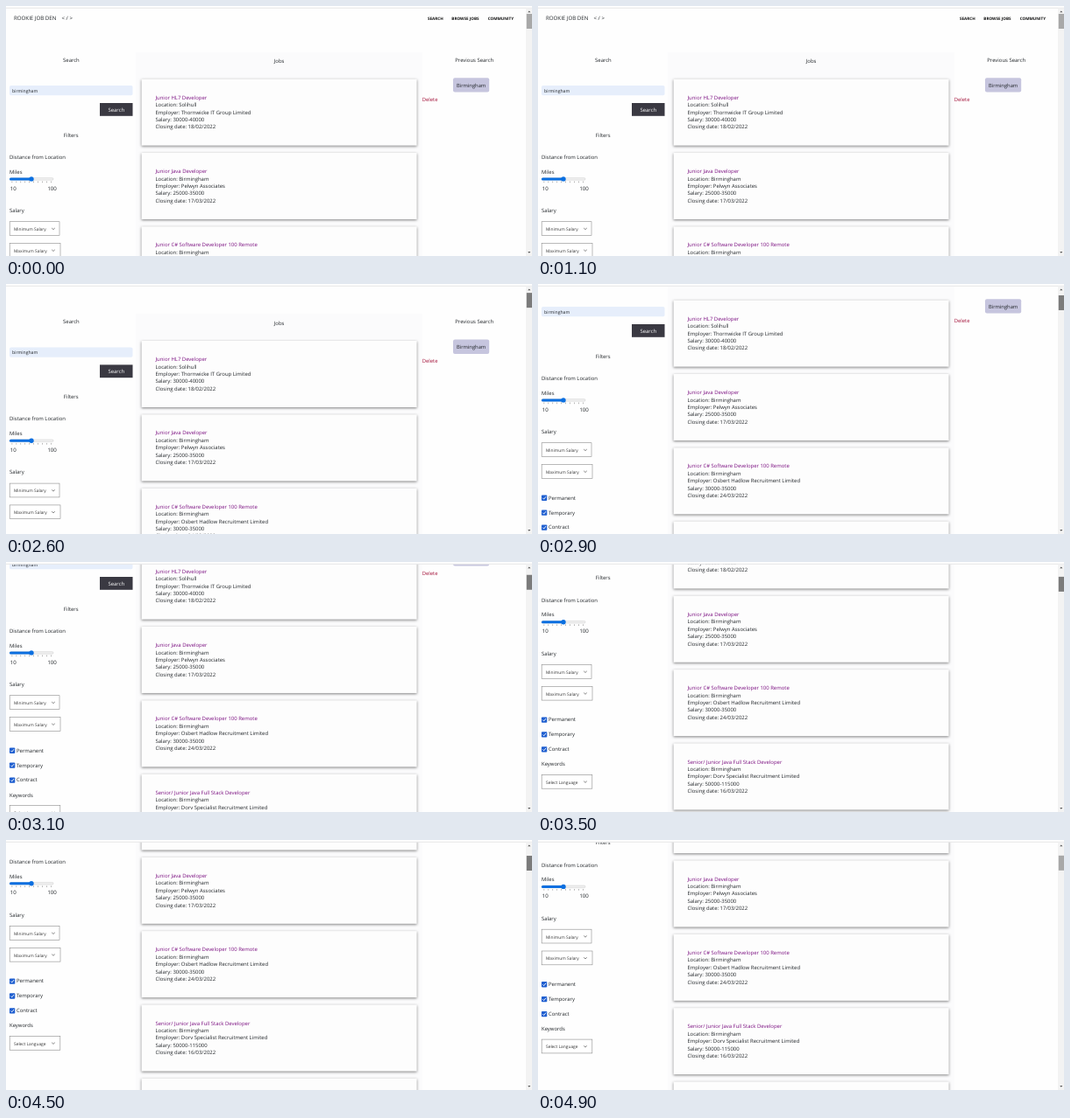
An HTML page for the animation above (5 s loop, 600 by 286 pixels).

```html
<!DOCTYPE html>
<html lang="en">
<head>
<meta charset="utf-8">
<title>Job board</title>
<style>
html, body { margin: 0; width: 100%; height: 100%; overflow: hidden; background: #fff; }
svg { display: block; width: 100vw; height: 100vh; }
text { font-family: "Open Sans", "Noto Sans", sans-serif; font-size: 5.95px; fill: #212529; text-rendering: geometricPrecision; white-space: pre; }
.card { fill: #fdfdfd; filter: drop-shadow(0 1px 1.6px rgba(0, 0, 0, .5)); }
</style>
</head>
<body>
<svg viewBox="0 0 600 286" preserveAspectRatio="none">
  <defs><clipPath id="view"><rect y="2.5" width="593" height="283.5"/></clipPath></defs>
  <rect width="600" height="286" fill="#fefefe"/>
  <g clip-path="url(#view)"><g id="page"></g></g>
  <rect y="1.8" width="600" height=".9" fill="#e4e4e6"/>
  <rect x="593" y="2.7" width="7" height="283.3" fill="#f3f3f3"/>
  <path d="M595.2 7.2L596.8 5.4L598.4 7.2Z M595.2 281L596.8 282.8L598.4 281Z" fill="#555"/>
  <rect id="thumb" x="593.8" y="9" width="6.2" height="17"/>
</svg>
<script>
const LOOP = 5000, STEP = 100;
const page = document.getElementById('page');
const thumb = document.getElementById('thumb');

function add(tag, attrs, content) {
  const el = document.createElementNS('http://www.w3.org/2000/svg', tag);
  for (const key in attrs) el.setAttribute(key, attrs[key]);
  if (content) el.textContent = content;
  page.appendChild(el);
  return el;
}

// y is the middle of the capitals
function label(content, x, y, { size = 5.95, fill = '#212529', anchor = 'start', weight = 400 } = {}) {
  const style = `font-size:${size}px;fill:${fill};font-weight:${weight}`;
  return add('text', { x, y: y + 2.1, 'text-anchor': anchor, style }, content);
}

function box(x, y, width, height, fill, more = {}) {
  return add('rect', { x, y, width, height, fill, ...more });
}

function header() {
  label('ROOKIE JOB DEN', 9, 14.2, { size: 6.15 });
  label('< / >', 63.5, 14.2, { size: 6.1 });
  [['SEARCH', 481], ['BROWSE JOBS', 508.3], ['COMMUNITY', 549.7]].forEach(([name, x]) =>
    label(name, x, 13.5, { size: 4.6, weight: 700, fill: '#111' }));
}

function dropdown(name, y, width) {
  box(4.2, y, width, 15.8, '#fff', { stroke: '#8c8c8c', 'stroke-width': .6 });
  label(name, 9, y + 8.2, { size: 4.85, fill: '#333' });
  add('path', { d: `M52.2 ${y + 7.3}l1.8 1.7l1.8 -1.7`, fill: 'none', stroke: '#444', 'stroke-width': .65 });
}

function checkbox(name, y) {
  box(4, y - 2.9, 6.3, 6.3, '#1f5fd0', { rx: .8 });
  add('path', { d: `M5.3 ${y + .3}l1.4 1.4l2.4 -3`, fill: 'none', stroke: '#fff', 'stroke-width': .9 });
  label(name, 12, y);
}

function slider() {
  box(4, 196.6, 50, 2.6, '#efefef', { rx: 1.3, stroke: '#c4c4c4', 'stroke-width': .4 });
  box(4, 196.4, 25, 3, '#0b6fe0', { rx: 1.5 });
  for (let i = 0; i < 10; i++) box(6.6 + i * 4.95, 200.5, .6, 1.7, '#888');
  add('circle', { cx: 29, cy: 197.9, r: 2.7, fill: '#0b6fe0' });
  label('10', 4.8, 208.5, { size: 6.1 });
  label('100', 47.4, 208.5, { size: 6.1 });
}

function filters() {
  label('Search', 74.4, 61.6, { anchor: 'middle' });
  box(4, 91, 140.5, 11.3, '#e6eefb', { rx: 1.8 });
  label('birmingham', 7, 96.8, { size: 5.1 });
  box(107, 111, 37.5, 14.8, '#3a3942');
  label('Search', 125.8, 118.6, { anchor: 'middle', fill: '#fff' });
  label('Filters', 74.2, 147.5, { anchor: 'middle' });
  label('Distance from Location', 4, 173);
  label('Miles', 4, 189.6);
  slider();
  label('Salary', 4, 234);
  dropdown('Minimum Salary', 246.7, 56.8);
  dropdown('Maximum Salary', 271.5, 57.8);
  ['Permanent', 'Temporary', 'Contract'].forEach((name, i) => checkbox(name, 309.5 + i * 16.9));
  label('Keywords', 4, 360.4);
  dropdown('Select Language', 372.6, 57.6);
}

const jobs = [
  ['Junior HL7 Developer', 'Solihull', 'Thornwicke IT Group Limited', '30000-40000', '18/02/2022'],
  ['Junior Java Developer', 'Birmingham', 'Pelwyn Associates', '25000-35000', '17/03/2022'],
  ['Junior C# Software Developer 100 Remote', 'Birmingham', 'Osbert Hadlow Recruitment Limited', '30000-35000', '24/03/2022'],
  ['Senior/ Junior Java Full Stack Developer', 'Birmingham', 'Dorv Specialist Recruitment Limited', '50000-115000', '16/03/2022'],
  []
];

function jobList() {
  box(148, 53, 327, 460, '#fbfbfc');
  label('Jobs', 311.6, 63.2, { anchor: 'middle' });
  jobs.forEach(([title, place, employer, pay, closes], i) => {
    const y = 83.6 + i * 84.35;
    box(154.6, y, 314, 76, '#fdfdfd', { class: 'card' });
    if (!title) return;
    label(title, 170.5, y + 21, { fill: '#7b0f80' });
    ['Location: ' + place, 'Employer: ' + employer, 'Salary: ' + pay, 'Closing date: ' + closes]
      .forEach((line, n) => label(line, 170.5, y + 29.5 + n * 8.4));
  });
}

function history() {
  label('Previous Search', 534.2, 61.6, { anchor: 'middle' });
  box(510, 82.2, 41.2, 16.4, '#c6c5de', { rx: 2 });
  label('Birmingham', 530.6, 90.7, { anchor: 'middle', size: 5.8 });
  label('Delete', 474.8, 107, { fill: '#a3123a', size: 5.85 });
}

// [time in ms, scroll distance]
const scrollPath = [
  [0, 0], [2300, 0], [2400, 3], [2500, 9], [2600, 18.6], [2800, 49], [3000, 81], [3100, 94],
  [3500, 129.2], [3800, 149.5], [4100, 155], [4400, 150], [4700, 144.5], [5000, 144.5]
];

function scrollAt(t) {
  const i = scrollPath.findIndex(([time]) => time > t);
  const [t0, y0] = scrollPath[i - 1], [t1, y1] = scrollPath[i];
  return y0 + (y1 - y0) * (t - t0) / (t1 - t0);
}

function draw(now) {
  const t = Math.floor((now % LOOP) / STEP) * STEP;
  const y = scrollAt(t);
  page.setAttribute('transform', `translate(0 ${-y})`);
  thumb.setAttribute('y', 9 + y * .061);
  thumb.setAttribute('fill', t >= 2300 && t < 4700 ? '#7b7b7b' : '#a8a8a8');
}

header();
jobList();
filters();
history();

let start;
function tick(now) {
  start ??= now;
  draw(now - start);
  requestAnimationFrame(tick);
}
draw(0);
requestAnimationFrame(tick);
</script>
</body>
</html>
```
